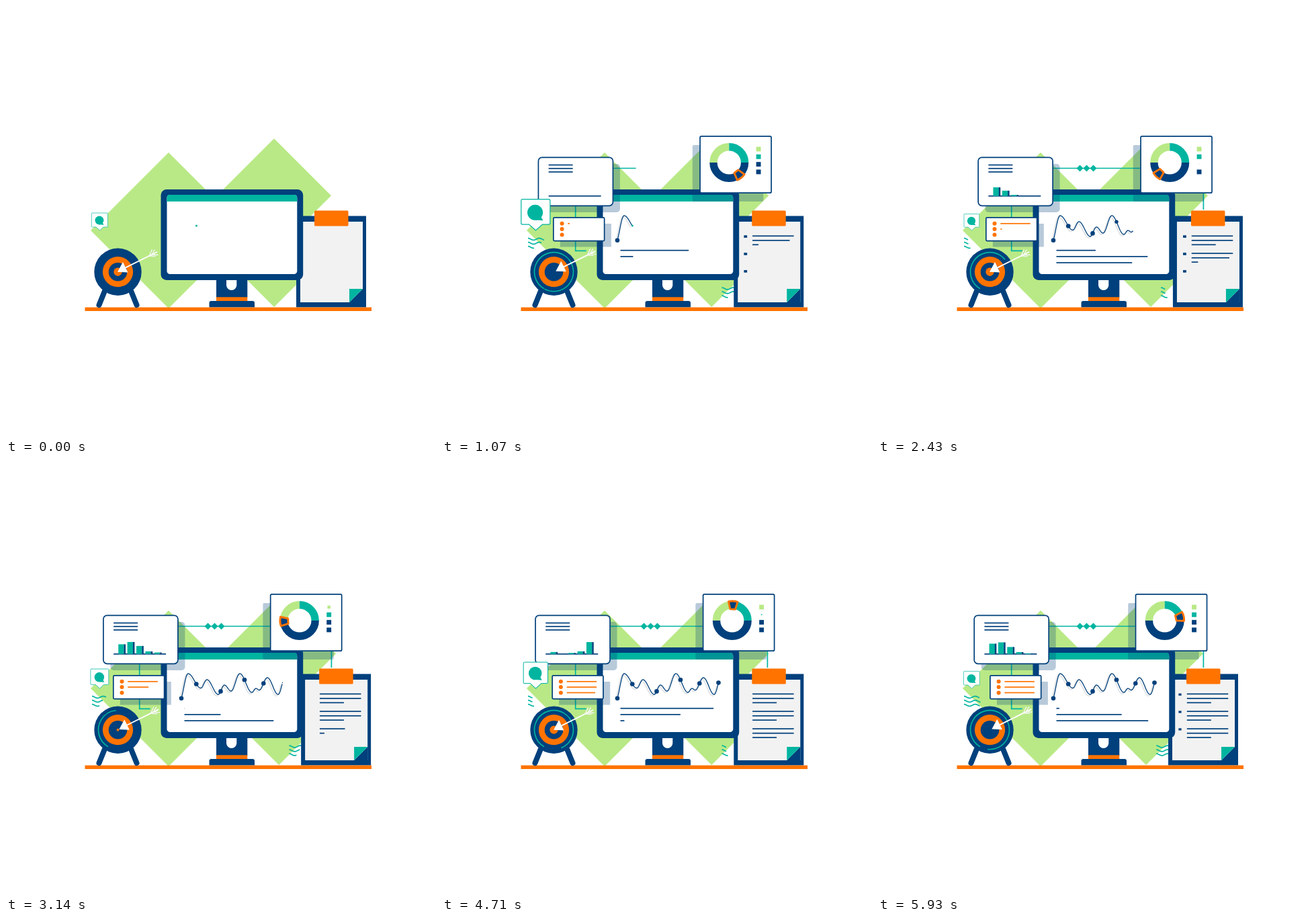
An HTML page with a canvas for the animation above (6000 ms loop, 640x640 px).

```html
<!DOCTYPE html>
<html>
<head>
<meta charset="utf-8">
<title>Analytics desk</title>
<style>
html, body { margin: 0; width: 100%; height: 100%; overflow: hidden; background: #fff; }
canvas { display: block; width: 640px; height: 640px; }
</style>
</head>
<body>
<canvas id="stage" width="640" height="640"></canvas>
<script>
const c = document.getElementById('stage').getContext('2d');
const LOOP = 6000;
const NAVY = '#00407c', TEAL = '#00b5a0', LIME = '#b9e986', ORANGE = '#ff7300';
const PAPER = '#f2f2f2', SHADE = 'rgba(0,64,124,.28)';

const clamp = v => Math.max(0, Math.min(1, v));
const soft = v => (1 - Math.cos(Math.PI * v)) / 2;
const ramp = (t, start, dur) => clamp((t - start) / dur);
const pop = (t, start, dur) => 1 - Math.pow(1 - ramp(t, start, dur), 3);
// 0 to 1 and back once per period, resting before start.
const pulse = (t, period, start) => t < start ? 0 : soft(2 * (t - start) / period);

// Eased value at t through [position, value] points.
function through(t, pts) {
  if (t <= pts[0][0]) return pts[0][1];
  const i = pts.findIndex(p => t < p[0]);
  if (i < 0) return pts[pts.length - 1][1];
  const [a, from] = pts[i - 1], [b, to] = pts[i];
  return from + (to - from) * soft((t - a) / (b - a));
}

function rect(x, y, w, h, fill) {
  c.fillStyle = fill;
  c.fillRect(x, y, w, h);
}
function round(x, y, w, h, r, fill, stroke) {
  c.beginPath();
  c.roundRect(x, y, w, h, r);
  c.fillStyle = fill;
  c.fill();
  if (!stroke) return;
  c.strokeStyle = stroke;
  c.lineWidth = 1.7;
  c.stroke();
}
function trace(pts) {
  c.beginPath();
  for (let i = 0; i < pts.length; i += 2) c.lineTo(pts[i], pts[i + 1]);
}
function poly(pts, fill) {
  trace(pts);
  c.fillStyle = fill;
  c.fill();
}
function path(pts, color, width) {
  trace(pts);
  c.strokeStyle = color;
  c.lineWidth = width;
  c.stroke();
}
function disc(x, y, r, fill) {
  c.beginPath();
  c.arc(x, y, r, 0, 7);
  c.fillStyle = fill;
  c.fill();
}
function arc(x, y, r, from, to, color, width) {
  c.beginPath();
  c.arc(x, y, r, from, to);
  c.strokeStyle = color;
  c.lineWidth = width;
  c.stroke();
}
function rule(x, y, len, color = NAVY) {
  rect(x, y - 0.85, len, 1.7, color);
}
function diamond(x, y, r, fill) {
  poly([x, y - r, x + r, y, x, y + r, x - r, y], fill);
}
// Draws a group scaled around (x, y).
function scaled(x, y, s, draw) {
  if (s <= 0) return;
  c.save();
  c.translate(x, y);
  c.scale(s, s);
  c.translate(-x, -y);
  draw();
  c.restore();
}

const boardX = t => through(t, [[0, 0], [2850, 7.3], [5850, 0]]);
const panelX = t => through(t, [[650, 0], [3400, 10.4], [6000, 0]]);
const cardX = t => through(t, [[850, 0], [2550, 6], [4000, -6], [5900, 0]]);
const listX = t => through(t, [[400, 0], [3100, -7.1], [5900, 0]]);

function waves(x, y, t) {
  for (let i = 0; i < 3; i++) {
    const grow = ramp(t, i * 300, 800);
    const len = 25 * grow * (.25 + .75 * pulse(t, 2250, 100 + i * 200));
    const pts = [];
    for (let d = 0; d < len; d += 0.5) {
      pts.push(x + d, y + i * 6 - 1.4 * Math.cos(d * 0.377));
    }
    path(pts, TEAL, 1.7);
  }
}

function backdrop(t) {
  const x = boardX(t);
  diamond(242, 334, 116, LIME);
  diamond(399 + x, 282.3, 85, LIME);
  diamond(399 + x, 363, 85, LIME);
  waves(128, 347, t);
  waves(414.3 + x, 420.5, t);
}

function clipboard(t) {
  c.save();
  c.translate(boardX(t), 0);
  rect(432, 312.5, 104, 136, NAVY);
  rect(438, 321, 93, 120, PAPER);
  poly([531, 421, 531, 441, 511, 441], NAVY);
  poly([511, 421, 531, 421, 511, 441], TEAL);
  round(459, 304.5, 50.5, 23, 1.5, ORANGE);
  const b = clamp(1.4 * pulse(t, 1600, 0));
  for (let g = 0; g < 3; g++) {
    const y = 342.3 + g * 25.9, s = t - g * 1350;
    rect(449.5 - 2.4 * b, y + .8 - 1.8 * b, 4.8 * b, 3.6 * b, NAVY);
    rule(459.8, y, 61.5 * ramp(s, 50, 640));
    rule(459.8, y + 6.6, 61.5 * ramp(s, 350, 800));
    rule(459.8, y + 13, 36 * ramp(s, 900, 680));
  }
  c.restore();
}

// The chart line eases between its turning points.
const turns = [[258, 354], [271, 312], [290, 333.5], [299, 321], [316, 343], [325, 329],
  [335, 338], [348, 312], [366, 340], [372, 334], [377, 336.5], [389, 318], [405, 343], [417, 312]];
const markers = [261, 283.3, 319.5, 355, 383.3, 411.5];
const curve = [];
let total = 0;
for (let x = 261; x <= 411.5; x += 0.5) {
  const y = through(x, turns), last = curve[curve.length - 1];
  if (last) total += Math.hypot(x - last.x, y - last.y);
  curve.push({ x, y, len: total });
}

function chart(t) {
  const start = 590, dur = 2400;
  const drawn = curve.filter(p => p.len < total * ramp(t, start, dur));
  path(drawn.flatMap(p => [p.x - 2.3, p.y + 2]), '#e3e5e7', 2);
  path(drawn.flatMap(p => [p.x, p.y]), NAVY, 1.3);
  if (t < 1200) disc(283.4, 327, 1.5, TEAL);
  markers.forEach(x => {
    const p = curve.find(q => q.x >= x - 0.5);
    disc(x, through(x, turns), 3.3 * ramp(t, start + 100 + p.len / total * dur, 300), NAVY);
  });
}

function monitor(t) {
  rect(313, 406, 46.3, 28, NAVY);
  rect(313, 433.3, 46.3, 6, ORANGE);
  round(328, 400, 15.3, 23, 7.6, '#fff');
  round(302.5, 439, 67.5, 9.5, [3, 3, 0, 0], NAVY);
  round(230.5, 273, 211.7, 135, 8.5, NAVY);
  round(239.5, 281, 193.8, 118, 4.5, '#fff');
  round(239.5, 281, 193.8, 10, [4.5, 4.5, 0, 0], TEAL);
  chart(t);
  for (let i = 0; i < 3; i++) {
    rule(265.5, 363.7 + i * 9.2, 140.5 * pulse(t, 3000 + i * 100, 100 + i * 600));
  }
}

function target(t) {
  const x = 166.5, y = 395.7, u = pulse(t, 2400, 0);
  c.lineCap = 'round';
  path([147, 424, 138.5, 445], NAVY, 8);
  path([186, 424, 194.5, 445], NAVY, 8);
  c.lineCap = 'butt';
  disc(x, y, 35.2, NAVY);
  const turn = ramp(t, 200, 700) * (.4 + .6 * pulse(t, 4500, -1300));
  arc(x, y, 29, 2.1, 2.1 + turn * Math.PI * 2, TEAL, 1.6);
  disc(x, y, 22.6, ORANGE);
  disc(x, y, 13.8, NAVY);
  disc(x, y, 6.2 * (1 - u), ORANGE);

  c.save();
  c.translate(3.4 * u, -1.2 * u);
  poly([166, 395.8, 174, 381, 181.5, 396.5], '#fff');
  path([175, 390.8, 225, 366], '#fff', 1.9);
  for (const d of [0, 4]) {
    path([213 + d, 372 - d / 2, 217.5 + d, 362.5], '#f4f5f6', 1.4);
    path([213 + d, 372 - d / 2, 222.5 + d, 372.5 - d / 2], '#f4f5f6', 1.4);
  }
  c.restore();
}

function links(t) {
  path([200, 241.5, 200 + 200 * ramp(t, 650, 950), 241.5], TEAL, 1.7);
  for (let i = 0; i < 3; i++) {
    diamond(300.5 + i * 10, 241.5, 5 * ramp(t, 1400 + i * 180, 250), TEAL);
  }
  const down = 297 + 67.4 * ramp(t, 500, 350);
  path([198.7, 297, 198.7, down, 198.7 + 16 * ramp(t, 850, 150), down], TEAL, 1.7);
  path([484.4, 278, 484.4, 278 + 25 * ramp(t, 1950, 400)], TEAL, 1.7);
}

const barTops = [16, 18, 15, 9, 22];
function card(t) {
  const x = 143.2 + cardX(t), base = 282.8;
  scaled(x + 55, 261, pop(t, 150, 500), () => {
    round(x + 10.5, 235, 111, 72, 5, SHADE);
    round(x, 225.3, 111, 72, 5.5, '#fff', NAVY);
    const p = ramp(t, 500, 400);
    for (let i = 0; i < 3; i++) rule(x + 15.2, 236.6 + i * 5.2, 36 * p);
    rule(x + 15.2, base, 78 * p);
    barTops.forEach((top, i) => {
      const h = top * pulse(t, 2900, 1400 + i * 360), bx = x + 22.3 + i * 13.4;
      rect(bx, base - h, 8.5, h, TEAL);
      rect(bx + 8.3, base - h, 2.5, h, NAVY);
    });
  });
}

function list(t) {
  const x = 166.9 + listX(t);
  scaled(x + 38, 332, pop(t, 350, 450), () => {
    rect(x + 10, 324, 76, 34.5, SHADE);
    round(x, 314.8, 75.8, 34.8, 1.5, '#fff', NAVY);
    for (let i = 0; i < 3; i++) {
      const y = 323.8 + i * 8.3;
      disc(x + 12.7, y, 3, ORANGE);
      rule(x + 21.5, y, 44.5 * ramp(t, 1000 + i * 1380, 1200 - i * 100), ORANGE);
    }
  });
}

function donut(x, y, t) {
  arc(x, y, 23.3, 0, Math.PI, NAVY, 11.4);
  arc(x, y, 23.3, Math.PI, 1.5 * Math.PI, LIME, 11.4);
  arc(x, y, 23.3, 1.5 * Math.PI, 2 * Math.PI, TEAL, 11.4);
  c.save();
  c.translate(x, y);
  c.rotate((t * 0.0609 - 14) * Math.PI / 180);
  c.beginPath();
  c.moveTo(17, -3.8);
  c.lineTo(28, -6.8);
  c.quadraticCurveTo(30, 0, 28, 6.8);
  c.lineTo(17, 3.8);
  c.closePath();
  c.fillStyle = NAVY;
  c.fill();
  c.strokeStyle = ORANGE;
  c.lineWidth = 2.9;
  c.lineJoin = 'round';
  c.stroke();
  c.restore();
}

function panel(t) {
  const x = 383.5 + panelX(t), cx = x + 43.2, cy = 233;
  scaled(x + 53, 236, pop(t, 200, 430), () => {
    round(x - 11.3, 207, 105.5, 84, 2, SHADE);
    round(x, 193.9, 106, 84.3, 2, '#fff', NAVY);
    scaled(cx, cy, pop(t, 450, 400), () => donut(cx, cy, t));
    // The top three squares blink in turn, the third one first.
    [LIME, TEAL, NAVY, NAVY].forEach((color, i) => {
      const blink = i < 3 ? 2250 + 1365 * ((i + 1) % 3) : LOOP * 2;
      const s = 6.9 * ramp(t, 600, 400) * ramp(Math.abs(t - blink), 150, 500);
      rect(x + 87 - s / 2, 213 + i * 11.3 - s / 2, s, s, color);
    });
  });
}

function bubble(t) {
  scaled(139.4, 334, .5 + .5 * pulse(t, 2980, -330), () => {
    c.beginPath();
    c.moveTo(119.5, 287.5);
    c.arcTo(161, 287.5, 161, 325, 2);
    c.arcTo(161, 325, 149, 325, 2);
    c.lineTo(149.5, 325);
    c.lineTo(139.5, 334);
    c.lineTo(129.5, 325);
    c.arcTo(117.7, 325, 117.7, 287.5, 2);
    c.arcTo(117.7, 287.5, 161, 287.5, 2);
    c.closePath();
    c.fillStyle = '#fff';
    c.fill();
    c.strokeStyle = TEAL;
    c.lineWidth = 1.2;
    c.stroke();
    disc(138.6, 307.2, 11.6, TEAL);
    poly([139, 318.5, 147, 313, 150.5, 319.3], TEAL);
  });
}

function draw(t) {
  rect(0, 0, 640, 640, '#fff');
  backdrop(t);
  clipboard(t);
  monitor(t);
  rect(117.5, 448.5, 426.5, 5.5, ORANGE);
  links(t);
  card(t);
  list(t);
  panel(t);
  bubble(t);
  target(t);
}

const begin = performance.now();
function tick() {
  draw((performance.now() - begin) % LOOP);
  requestAnimationFrame(tick);
}
tick();
</script>
</body>
</html>
```
